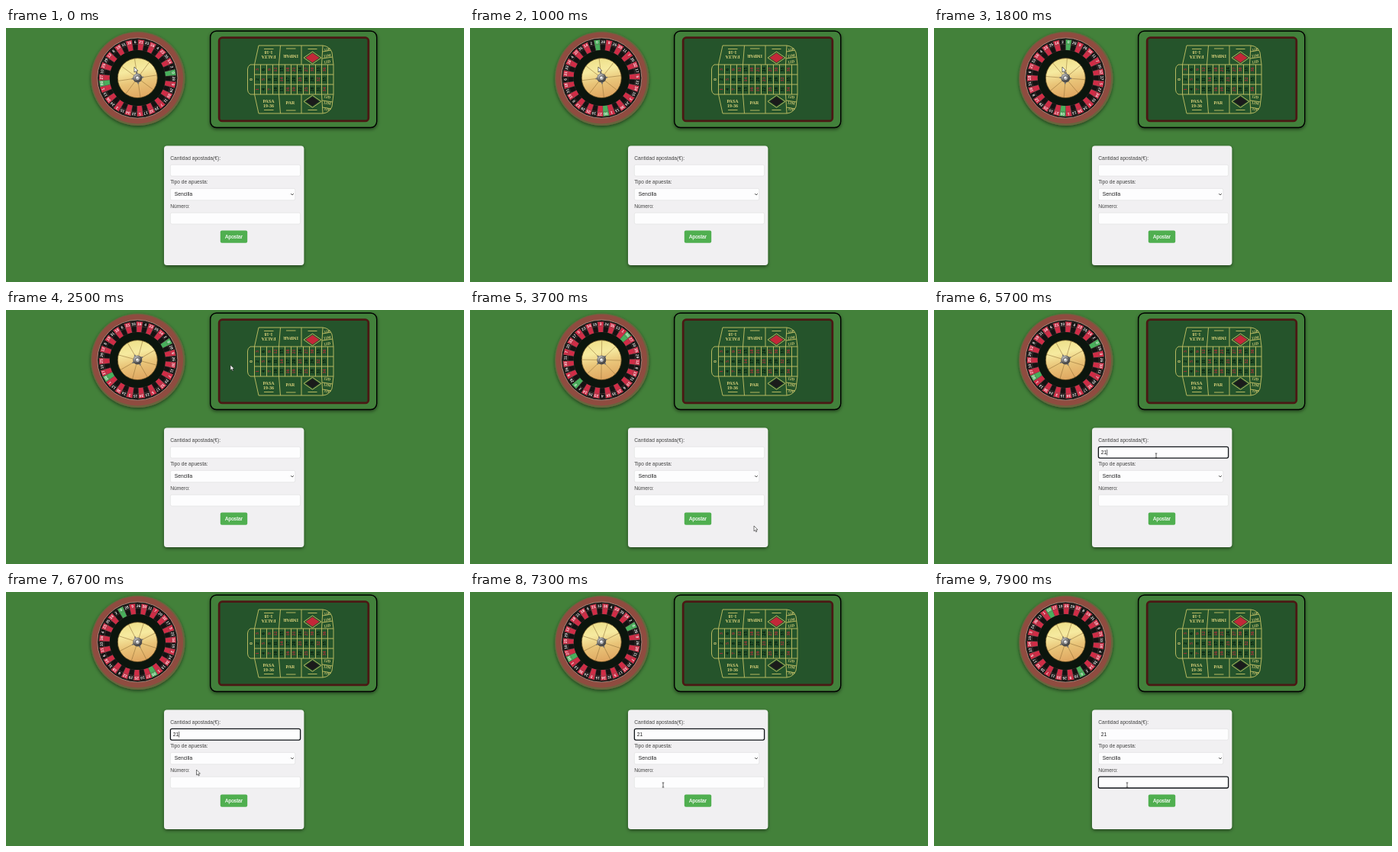
Recreate the animation shown at these times as an HTML page. Size 600 px wide and 333 px high, loop 8000 ms.

```html
<!DOCTYPE html>
<html lang="es">
<head>
<meta charset="utf-8">
<title>Ruleta</title>
<style>
  html, body { margin: 0; width: 100%; height: 100%; overflow: hidden; background: #43813a; }
  svg { display: block; width: 600px; height: 333px; }
  .form { font: 6.67px "Liberation Sans", Arial, sans-serif; fill: #444; }
  .field { fill: #fdfdfe; stroke: #ddd; stroke-width: .6; }
  .focus { stroke: #101418; stroke-width: 1.3; }
  .lines { fill: none; stroke: #b5b860; stroke-width: 1; }
  .cloth { font: bold 6px "Liberation Serif", Times, serif; fill: #d8d07a; text-anchor: middle; }
  .cloth .red { fill: #b02a38; }
  .cloth .black { fill: #07150a; }
  .cloth .dozen { font-size: 5px; }
  .digits { font: bold 5px "Liberation Sans", Arial, sans-serif; fill: #f0eaea; text-anchor: middle; }
</style>
</head>
<body>
<svg viewBox="0 0 600 333">
  <defs>
    <linearGradient id="gold" x1=".4" y1="0" x2=".6" y2="1">
      <stop offset="0" stop-color="#eee08a"/>
      <stop offset=".3" stop-color="#f6eaa0"/>
      <stop offset=".6" stop-color="#e9c478"/>
      <stop offset="1" stop-color="#dfa560"/>
    </linearGradient>
    <radialGradient id="hub" cx=".4" cy=".35">
      <stop offset="0" stop-color="#eee"/>
      <stop offset=".55" stop-color="#999"/>
      <stop offset="1" stop-color="#4a4a4a"/>
    </radialGradient>
    <filter id="shadow" x="-20%" y="-20%" width="140%" height="140%">
      <feDropShadow dx="0" dy="1.7" stdDeviation="1.9" flood-opacity=".5"/>
    </filter>
  </defs>

  <g transform="translate(172.3 65.6)">
    <circle cx=".5" cy=".6" r="61.7" fill="#68653d" filter="url(#shadow)"/>
    <circle r="59.8" fill="#8f4c40"/>
    <circle r="52.6" fill="#0d0f0d" stroke="#b08f84" stroke-width=".9"/>
    <g id="wheel"></g>
    <circle r="36.5" fill="#0b150d"/>
    <circle r="26" fill="url(#gold)" stroke="#5e481d" stroke-width=".8"/>
    <g id="spokes">
      <g id="rays" stroke="#8d6c35" stroke-width=".5"></g>
      <g stroke="#777" stroke-width="2" stroke-linecap="round"><path d="M-7 0H7M0 -7V7"/></g>
    </g>
    <circle r="6" fill="url(#hub)"/>
    <circle r="3" fill="#bbb" stroke="#444" stroke-width=".8"/>
    <circle cx="-.5" cy="-.7" r="1.1" fill="#fff"/>
  </g>

  <rect x="267.7" y="4" width="218" height="126.5" rx="8" fill="#43813a" stroke="#000" stroke-width="1.4" filter="url(#shadow)"/>
  <rect x="279.2" y="12.7" width="195.6" height="109.2" rx="4" fill="#25542b" stroke="#4b1814" stroke-width="2.8"/>
  <g id="numbers" class="cloth"></g>
  <g class="lines">
    <path id="grid"/>
    <path d="M325.5 48H320Q316.5 50 316.5 54V81Q316.5 85 320 87H325.5"/>
    <path id="half" d="M325.5 48L331 23H415Q424 24 427 32L429 48M359.5 23L357.5 48M387 23V48M415 23L413.5 48
      M414.7 31L426 29M414 40L428 38M338 27.5H350.5M367 27H379.5M395.5 27.5H407.5"/>
    <use href="#half" transform="matrix(1 0 0 -1 0 135)"/>
    <path d="M390 39L401.5 31L413 39L401.5 47Z"/>
    <path d="M390 96.3L401.5 88.3L413 96.3L401.5 104.3Z"/>
  </g>
  <path d="M392.5 39L401.5 32.7L410.5 39L401.5 45.3Z" fill="#c22838"/>
  <path d="M392.5 96.3L401.5 90L410.5 96.3L401.5 102.6Z" fill="#1b1b1b"/>
  <g class="cloth">
    <g transform="rotate(180 344 35)"><text x="344" y="34">FALTA</text><text x="344" y="40">1-18</text></g>
    <text transform="rotate(180 373 37)" x="373" y="39">IMPAR</text>
    <text x="344" y="98">PASA</text><text x="344" y="103.5">19-36</text>
    <text x="372.5" y="100">PAR</text>
    <text transform="translate(322.8 67.5) rotate(-90)">0</text>
  </g>

  <rect x="207" y="154.5" width="183.3" height="156.5" rx="4" fill="#f1f0f2" filter="url(#shadow)"/>
  <g class="form">
    <text x="215.2" y="173.2">Cantidad apostada(€):</text>
    <text x="215.2" y="204.4">Tipo de apuesta:</text>
    <text x="215.2" y="236.2">Número:</text>
    <rect id="amount" class="field" x="215.4" y="179.3" width="170.2" height="14.8" rx="2"/>
    <rect class="field" x="215.4" y="210.4" width="163.4" height="15.4" rx="2"/>
    <rect id="number" class="field" x="215.4" y="242.2" width="170.2" height="14.8" rx="2"/>
    <text id="value" x="218.8" y="189" fill="#222"></text>
    <text x="220.8" y="220.4" fill="#222">Sencilla</text>
    <path d="M373.3 217.2L375 218.9L376.7 217.2" fill="none" stroke="#222" stroke-width=".9"/>
    <rect x="280.8" y="265.6" width="35.4" height="16.2" rx="2" fill="#50af50"/>
    <text x="287" y="276" fill="#fff" stroke="#fff" stroke-width=".15">Apostar</text>
    <rect id="caret" width=".7" height="7.5" fill="#222"/>
  </g>

  <path id="arrow" d="M0 0V7L1.6 5.6L2.7 8L3.8 7.5L2.8 5.1H4.9Z" fill="#fff" stroke="#222" stroke-width=".6"/>
  <path id="beam" d="M-1.3 -3H1.3M0 -3V3M-1.3 3H1.3" stroke="#222" stroke-width=".7"/>
</svg>
<script>
const $ = id => document.getElementById(id);
const LOOP = 8000, STEP = 100, BLINK = 530;
const FOCUS = 4800, TYPE = [5100, 5400], NEXT = 7370;

// Wheel: 38 pockets, the two zeros opposite each other
const order = ("0 28 9 26 30 11 7 20 32 17 5 22 34 15 3 24 36 13 1 " +
  "00 27 10 25 29 12 8 19 31 18 6 21 33 16 4 23 35 14 2").split(" ");
const slice = 360 / order.length;
const point = (r, deg) => {
  const a = deg * Math.PI / 180;
  return `${(r * Math.cos(a)).toFixed(2)} ${(r * Math.sin(a)).toFixed(2)}`;
};
const wedge = (r1, r2, h) => `M${point(r1, -h)}L${point(r2, -h)}L${point(r2, h)}L${point(r1, h)}Z`;
$("wheel").innerHTML = order.map((n, i) => {
  const color = i % 19 === 0 ? "#48b05c" : i % 2 ? "#141212" : "#d02c46";
  return `<g transform="rotate(${i * slice})">
    <path d="${wedge(36.5, 50.5, slice / 2)}" fill="${color}" stroke="#6d5a56" stroke-width=".3"/>
    <text class="digits" transform="translate(45.6 0) rotate(90)">${n}</text></g>`;
}).join("") + `<circle r="44.3" fill="none" stroke="#6d5a56" stroke-width=".4"/>`;
$("rays").innerHTML = [0, 45, 90, 135].map(a =>
  `<path d="M-25.5 0H25.5" transform="rotate(${a})"/>`).join("");

// Betting cloth
const reds = order.filter((n, i) => i % 19 && i % 2 === 0);
let grid = "M325.5 48H429V87H325.5ZM325.5 61H429M325.5 74H429";
let numbers = "";
for (let n = 1; n <= 36; n++) {
  const col = Math.floor((n - 1) / 3), row = (n - 1) % 3;
  if (!row) grid += `M${333.5 + col * 8} 48V87`;
  numbers += `<text class="${reds.includes(String(n)) ? "red" : "black"}"
    transform="translate(${331.3 + col * 8} ${80.5 - row * 13}) rotate(-90)">${n}</text>`;
}
["P", "M", "D"].forEach((s, i) => {
  numbers += `<text class="dozen" transform="translate(420.8 ${28.5 + i * 8}) rotate(-10)" y="1.5">12${s}</text>
    <text class="dozen" transform="translate(420.8 ${106.5 - i * 8}) rotate(10)" y="1.5">12${s}</text>`;
});
$("grid").setAttribute("d", grid);
$("numbers").innerHTML = numbers;

// Keys are [time, ...values]
const drift = [[0, 0], [1000, 1.5], [2500, 23.5], [3700, 9.5], [5700, 25], [6700, 26.5], [8000, 26.5]];
const pointer = [[0, 168, 51], [1900, 168, 51], [2300, 290, 70], [2500, 294, 72], [2700, 310, 110],
  [3100, 345, 195], [3600, 370, 266], [3700, 372, 283], [3900, 372, 283], [4500, 305, 205],
  [4750, 291, 191], [6200, 291, 191], [6700, 249.5, 233], [7150, 253, 253], [8000, 253, 253]];

function at(keys, t) {
  const i = Math.max(1, keys.findIndex(k => k[0] >= t));
  const a = keys[i - 1], b = keys[i], f = (t - a[0]) / (b[0] - a[0]);
  return a.slice(1).map((v, j) => v + (b[j + 1] - v) * f);
}

function draw(t) {
  const turn = -8.5 - .45 * t + at(drift, t)[0];
  $("wheel").setAttribute("transform", `rotate(${turn})`);
  $("spokes").setAttribute("transform", `rotate(${turn})`);

  const [x, y] = at(pointer, t);
  const overField = x > 215 && x < 386 && (y > 179 && y < 194 || y > 242 && y < 257);
  for (const [id, show] of [["arrow", !overField], ["beam", overField]]) {
    $(id).setAttribute("transform", `translate(${x} ${y})`);
    $(id).style.display = show ? "" : "none";
  }

  const first = t >= FOCUS && t < NEXT, second = t >= NEXT;
  const typed = TYPE.filter(k => t >= k).length;
  $("amount").classList.toggle("focus", first);
  $("number").classList.toggle("focus", second);
  $("value").textContent = "21".slice(0, typed);

  const since = second ? NEXT : typed ? TYPE[typed - 1] : FOCUS;
  const lit = (first || second) && Math.floor((t - since) / BLINK) % 2 === 0;
  $("caret").style.display = lit ? "" : "none";
  $("caret").setAttribute("x", second ? 218.9 : 218.9 + typed * 3.75);
  $("caret").setAttribute("y", second ? 246 : 183);
}

const start = performance.now();
function tick() {
  const t = (performance.now() - start) % LOOP;
  draw(Math.floor(t / STEP) * STEP);
  requestAnimationFrame(tick);
}
tick();
</script>
</body>
</html>
```
